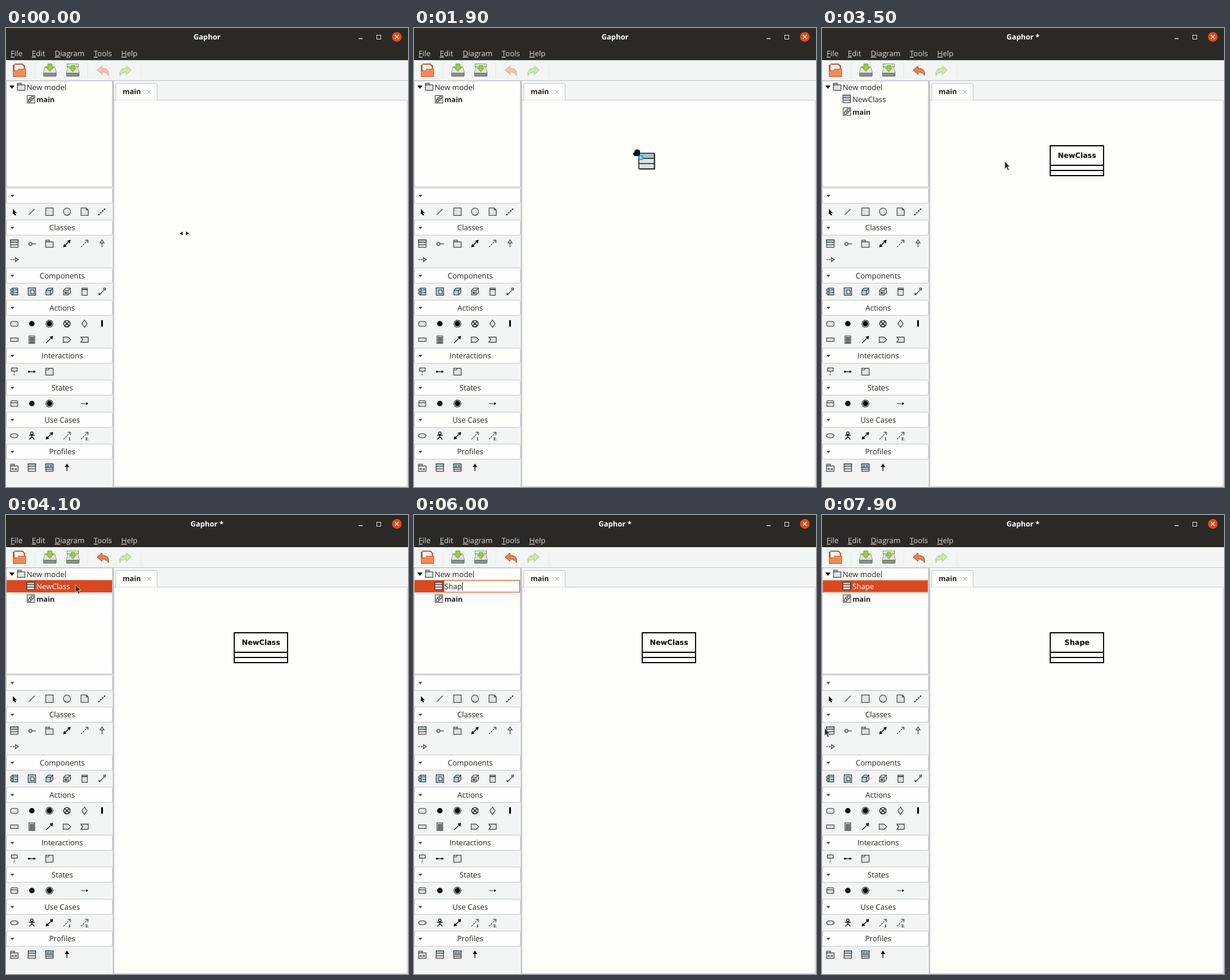
These frames come from a looping animation (701 px wide and 799 px high, 8 s). An HTML page:

```html
<!DOCTYPE html>
<html lang="en">
<head>
<meta charset="utf-8">
<title>Model editor</title>
<style>
  html, body { margin: 0; width: 100%; height: 100%; overflow: hidden; background: #f2f5f4; }
  svg { display: block; width: 701px; height: 799px; }
  text { font: 500 13.1px "Open Sans", "Noto Sans", sans-serif; fill: #242423; text-rendering: geometricPrecision; white-space: pre; }
  .bold { font-weight: 700; font-size: 12.4px; fill: #1e1e1d; }
  .title { font-weight: 700; font-size: 12.8px; fill: #fff; text-anchor: middle; }
  .menu { fill: #dad8d0; }
  .menu tspan { text-decoration: underline; }
  .head { text-anchor: middle; }
  .uml { font: bold 12.45px "DejaVu Sans", sans-serif; fill: #000; text-anchor: middle; }
  .icon { fill: none; stroke: #30302f; stroke-width: 1.1; }
  .icon .b { fill: #b3ccd7; }
  .icon .g { fill: #e1e4e3; }
  .icon .k { fill: #000; stroke: none; }
  .icon .w { stroke-width: 1.4; stroke: #111; }
  .icon .d { stroke-dasharray: 3 1.5; }
  .icon text { font: bold 8px "Liberation Serif", serif; fill: #222; stroke: none; }
  .icon .q { font: bold 8px "DejaVu Sans", sans-serif; text-anchor: middle; }
</style>
</head>
<body>
<svg id="stage" viewBox="0 0 701 799" xmlns="http://www.w3.org/2000/svg"></svg>
<script>
const LOOP = 8000;
const WHITE = '#fefefb', BORDER = '#bfc4c7', ORANGE = '#d9481f', INK = '#242423';

// Markup helpers
const path = (d, cls = '', more = '') => `<path d="${d}" class="${cls}" ${more}/>`;
const rect = (x, y, w, h, cls = '', more = '') =>
  `<rect x="${x}" y="${y}" width="${w}" height="${h}" class="${cls}" ${more}/>`;
const circle = (r, cls = '', x = 0, y = 0) => `<circle cx="${x}" cy="${y}" r="${r}" class="${cls}"/>`;
const text = (x, y, s, cls = '', more = '') => `<text x="${x}" y="${y}" class="${cls}" ${more}>${s}</text>`;
const group = (id, body, more = '') => `<g id="${id}" ${more}>${body}</g>`;
const paint = (fill, stroke = 'none') => `fill="${fill}" stroke="${stroke}"`;

const HEAD_NE = 'M.5 -5L6.5 -6.5L5 -.5Z', HEAD_SW = 'M-.5 5L-6.5 6.5L-5 .5Z';
const stripes = rect(-6.5, -6.5, 13, 13, 'g') + rect(-6.5, -6.5, 13, 4.3, 'b') + path('M-6.5 2H6.5');
const dashedArrow = path('M-6 6L5 -5', 'd') + path('M1 -6H6V-1');
const bothWays = path('M-5 5L5 -5', 'w') + path(HEAD_NE + HEAD_SW, 'k');
const folder = path('M-6.5 -3V-6H0V-3', 'b') + rect(-6.5, -3, 13, 9.5, 'g');
const cube = cls => path('M-6 -2L-2 -6H6V2L2 6H-6Z', cls) + path('M-6 -2H2V6M2 -2L6 -6');

// Icons are drawn around their own centre
const icons = {
  pointer: path('M-2.5 -4.5V5L-.5 3.2L1.2 6.8L3 6L1.4 2.5H4.5Z', 'k'),
  line: path('M-5 5L5 -5'),
  box: rect(-6.5, -6.5, 13, 13, 'g'),
  ellipse: circle(6.3, 'g'),
  note: path('M-6 -6.5H3L6.5 -3V6.5H-6Z', 'g') + path('M3 -6.5V-3H6.5'),
  dashes: path('M-6.5 6L6.5 -6.5', 'd', 'stroke-width="2"'),
  cls: stripes,
  iface: circle(2.8, 'g', -2.5, .5) + path('M.5 .5H7'),
  pkg: folder,
  assoc: bothWays,
  depend: dashedArrow,
  general: path('M0 6V-1') + path('M-3.5 -1L0 -6.5L3.5 -1Z', 'g'),
  realize: path('M-7 0H2', 'd') + path('M2 -3.5L7 0L2 3.5Z', 'g'),
  component: rect(-4, -6, 10, 12, 'b') + rect(-6.5, -4, 5, 3, 'g') + rect(-6.5, 1, 5, 3, 'g') + path('M1 -3H6M1 2H6'),
  artifact: rect(-6.5, -6.5, 13, 13, 'b') + path('M-2 -3H2L4 -1V4H-2Z', 'g'),
  node: cube('b'),
  device: cube('g') + path('M-4 1H0M-4 3.5H0', 'w'),
  subsystem: rect(-4.5, -6, 9.5, 12.5, 'g') + path('M-4.5 -3.5H5', 'w'),
  connector: path('M-3 4L4 -3') + rect(-6, 3, 3, 3, 'k') + rect(3, -6, 3, 3, 'g'),
  action: rect(-6.5, -4, 13, 8.5, 'g', 'rx="3.5"'),
  dot: circle(4.7, 'k'),
  ring: circle(6.2, 'g') + circle(4.7, 'k'),
  flowEnd: circle(5.7, 'g w') + path('M-4 -4L4 4M-4 4L4 -4', 'w'),
  diamond: path('M0 -6.5L4.5 0L0 6.5L-4.5 0Z', 'g'),
  bar: rect(-1.5, -6, 3, 11, 'k'),
  object: rect(-6.5, -3, 13, 6, 'g'),
  partition: rect(-5, -6.5, 10, 13, 'g') + rect(-2.8, -4, 2, 9, 'b') + rect(1, -4, 2, 9, 'b'),
  flow: path('M-6 6L4 -4', 'w') + path(HEAD_NE, 'k'),
  send: path('M-6.5 -4.5H2L6.5 0L2 4.5H-6.5Z', 'g'),
  accept: path('M-6.5 -4.5H6.5V4.5H-6.5L-3 0Z', 'g'),
  lifeline: rect(-5, -6.5, 10, 5.5, 'g') + path('M0 -1V7', 'd'),
  message: path('M-5 0H5', 'w') + path('M3 -2.5L7 0L3 2.5Z', 'k') + circle(1.8, 'k', -5),
  frame: rect(-6.5, -6, 13, 12, 'g') + path('M-6.5 -3H-2L0 -6'),
  state: rect(-6, -5, 12, 10, 'g', 'rx="2"') + path('M-6 -1.5H6'),
  arrow: path('M-6 0H5') + path('M3 -2.5L6.5 0L3 2.5Z', 'k'),
  useCase: `<ellipse rx="6.7" ry="3.5" class="g"/>`,
  actor: circle(2.2, 'w', 0, -4.5) + path('M0 -2V2M-5 -1H5M-4.5 6.5L0 2L4.5 6.5', 'w'),
  include: dashedArrow + text(3, 8, 'I'),
  extend: dashedArrow + text(1.5, 8, 'E'),
  profile: folder + text(0, 5, '«»', 'q'),
  stereotype: rect(-6.5, -6.5, 13, 13, 'g') + rect(-6.5, -6.5, 13, 7, 'b') + path('M-6.5 3.5H6.5') + text(0, 0, '«»', 'q'),
  extension: path('M0 6V-2', 'w') + path('M-4 -1L0 -7L4 -1Z', 'k'),
  diagram: rect(-6.5, -6.5, 13, 13, '', 'fill="#fff"') + rect(.5, -4.5, 4, 4) + rect(-4.5, .5, 4, 4) +
    path('M-2.5 .5V-2.5H.5M-.5 2.5H2.5V-.5')
};
const icon = (name, x, y) => `<g class="icon" transform="translate(${x} ${y})">${icons[name] || ''}</g>`;

// Header label, header centre, then one row of icons per string
const palette = [
  ['', 292, 'pointer line box ellipse note dashes'],
  ['Classes', 347.5, 'cls iface pkg assoc depend general', 'realize'],
  ['Components', 431, 'component artifact node device subsystem connector'],
  ['Actions', 487, 'action dot ring flowEnd diamond bar', 'object partition flow send accept'],
  ['Interactions', 570.5, 'lifeline message frame'],
  ['States', 626, 'state dot ring - arrow'],
  ['Use Cases', 682, 'useCase actor assoc include extend'],
  ['Profiles', 737.5, 'profile cls stereotype extension']
];
const section = ([label, y, ...rows]) =>
  rect(.5, y - 13.3, 185, 26.6, '', `rx="3" ${paint(WHITE, BORDER)}`) +
  path(`M7.5 ${y - 1.5}h7l-3.5 4z`, '', `fill="#444" id="fold${label.replace(' ', '')}"`) +
  text(98, y + 4.7, label, 'head') +
  rows.map((row, r) => row.split(' ').map((name, c) =>
    icon(name, 14.5 + c * 30.6, y + 27.8 + r * 27.8)).join('')).join('');

const titleBar = rect(0, 0, 701, 56, '', paint('#2a2925')) +
  text(350.5, 20, 'Gaphor', 'title', 'id="title"') +
  path('M615 18.5H622', '', 'stroke="#ddd" stroke-width="1.6"') +
  rect(646.5, 12.5, 7, 7, '', paint('none', '#e8e8e4')) +
  `<circle cx="681.5" cy="15.5" r="8.5" fill="#e2491f"/>` +
  path('M678 12L685 19M678 19L685 12', '', 'stroke="#fff" stroke-width="1.3"') +
  [['File', 8], ['Edit', 45], ['Diagram', 85], ['Tools', 153], ['Help', 201]].map(([s, x]) =>
    text(x, 49, `<tspan>${s[0]}</tspan>${s.slice(1)}`, 'menu')).join('');

const drive = path('M65 79L68 67.5H85L88 79Z', '', paint('#e4e6e2', '#8d918b')) +
  rect(65.5, 78.5, 22, 5.5, '', `rx="1" ${paint('#8b8f88', '#646862')}`);
const downArrow = path('M73 62.5H80V68H83.5L76.5 75.5L69.5 68H73Z', '', paint('#9ccc4a', '#5d9a22'));
const curl = 'M159 73L167.5 66V70C176 70 181 75 178.5 83C176.5 78.5 173 77 167.5 77V81Z';
const toolbar = rect(0, 56, 701, 36, '', paint('#f2f5f3')) +
  [50.5, 142.5, 235.5].map(x => path(`M${x} 61V87`, '', 'stroke="#e6e9e7"')).join('') +
  path('M12.5 64.5H15V62.5H29L32.5 66V84H12.5Z', '', paint('#c9502a', '#a83c1a')) +
  path('M15 64H28L31 67V76H15Z', '', paint('#f4f3ef', '#c9c4bf')) +
  path('M12.5 74.5H20L22 71.5H34.5V84.5H12.5Z', '', paint('#f08a58', '#cf5426')) +
  drive + downArrow +
  `<g transform="translate(40 0)">${drive}${rect(66.5, 62.5, 20, 5, '', paint('#eef5e2', '#6f9a45'))}` +
  `<g transform="translate(11.5 12) scale(.85)">${downArrow}</g></g>` +
  path(curl, '', `id="undo" stroke-linejoin="round"`) +
  path(curl, '', `transform="translate(377.5 0) scale(-1 1)" ${paint('#cfe6b0', '#a9c592')}`) +
  path('M0 91.5H701', '', `stroke="${BORDER}"`);

const canvasPane = rect(186, 92, 515, 33, '', paint('#f4f6f6')) +
  rect(188, 125.5, 511.5, 673, '', paint(WHITE, BORDER)) +
  path('M187.3 92V799', '', 'stroke="#bcc1c5" stroke-width="2"') +
  path('M191.5 125.5V99.5Q191.5 96.5 194.5 96.5H260.5Q263.5 96.5 263.5 99.5V125.5', '', paint(WHITE, BORDER)) +
  text(203.5, 115, 'main', 'bold') +
  path('M246 108L252 114M246 114L252 108', '', 'stroke="#b8babb" stroke-width="1.2"');

const corner = (x, y) => `<g transform="translate(${x} ${y})">` +
  rect(-4, -4, 8, 8, '', `${paint('#00ff00', '#007a00')} fill-opacity=".45"`) +
  path('M-2 -2L2 2M-2 2L2 -2', '', 'stroke="#075a07"') + '</g>';
const classItem = group('item',
  path('M398 205H491V257H398ZM398 239H491M398 248H491', '', `${paint('none', '#000')} stroke-width="1.9"`) +
  text(444.7, 225.5, '', 'uml', 'id="itemName"') +
  group('handles', corner(397.5, 204.5) + corner(491.5, 204.5) + corner(397.5, 257.5) + corner(491.5, 257.5)));

const tree = rect(.5, 92, 185, 184.7, '', `${paint(WHITE, BORDER)} stroke-width="1.2"`) +
  path('M5.5 100H15L10.2 106Z', '', 'fill="#222"') + icon('pkg', 26.5, 102) + text(36, 107.5, 'New model') +
  group('selection', rect(1, 113.3, 184, 21.5, '', paint(ORANGE))) +
  rect(1.5, 114, 183, 20, '', `id="focus" ${paint('none', '#f7cdbf')} stroke-dasharray="1 1"`) +
  rect(52.5, 113.8, 131.8, 20.5, '', `id="entry" ${paint(WHITE, ORANGE)}`) +
  rect(53, 116, 61, 16, '', `id="marked" ${paint(ORANGE)}`) +
  group('classRow', icon('cls', 43, 123.5) + text(53, 129, '', '', 'id="rowName"')) +
  path('M0 117V132', '', 'id="caret" stroke="#222"') +
  group('mainRow', icon('diagram', 43.5, 124) + text(53, 129, 'main', 'bold'));

const dragged = group('dragged',
  rect(2, 2, 28, 28, '', paint('#555') + ' opacity=".6"') +
  rect(1, 1, 27, 27, '', paint('#dfe2e2')) + rect(1, 1, 27, 9, '', paint('#a2c2d1')) +
  path('M1 1H28V28H1ZM1 10H28M1 19H28', '', `${paint('none', '#1c1c1c')} stroke-width="1.6"`));

const cursors = group('resize', path('M-8 0L-3 -3.2V3.2ZM8 0L3 -3.2V3.2Z', '', 'fill="#000"')) +
  group('arrow', path('M.5 0V13.5L3.6 10.5L6 16L8.3 15L6 9.6H10Z', '', paint('#2d2d2d', '#fff') + ' stroke-width=".7"')) +
  group('ibeam', path('M-3 -7.5H-1L0 -6.5L1 -7.5H3M0 -6.5V6.5M-3 7.5H-1L0 6.5L1 7.5H3', '', paint('none', '#222'))) +
  group('hand', path('M-4 -3L-2 -4L0 -5L3 -4L5 -3V4L4 7H-4L-7 4V1H-5Z', '', paint('#111')) +
    `<circle cx="6.5" cy="9.5" r="4.6" fill="#29a3dc"/>` +
    path('M4 9.5H9M6.5 7V12', '', 'stroke="#fff" stroke-width="1.2"'));

const stage = document.getElementById('stage');
stage.innerHTML = rect(0, 0, 701, 799, '', paint('#f2f5f4')) + titleBar + toolbar + canvasPane + tree +
  palette.map(section).join('') + classItem + dragged + cursors;

// Steps: time, then the values that hold from there on
const pointerSteps = [
  [0, 'resize', 311, 357.5], [300, 'arrow', 310, 356],
  [500, 'arrow', 280, 358], [600, 'arrow', 180, 363], [700, 'arrow', 70, 371], [800, 'arrow', 9, 375],
  [1300, 'hand', 83, 346], [1400, 'hand', 238, 300], [1500, 'hand', 365, 240],
  [1800, 'hand', 383, 224], [1900, 'hand', 389, 216], [2000, 'hand', 393, 210], [2100, 'hand', 396, 206], [2200, 'hand', 397, 204],
  [2400, 'arrow', 397, 203], [2700, 'arrow', 395, 207], [2900, 'arrow', 394, 209], [3100, 'arrow', 394, 210],
  [3300, 'arrow', 382, 222], [3400, 'arrow', 354, 232], [3500, 'arrow', 318, 232],
  [3600, 'arrow', 260, 209], [3700, 'arrow', 205, 172], [3800, 'arrow', 164, 148],
  [4000, 'arrow', 133, 127], [4100, 'arrow', 120.5, 121.5], [5000, 'ibeam', 121, 124], [5500, ''],
  [7200, 'arrow', 121, 122], [7300, 'arrow', 120, 210], [7400, 'arrow', 112, 333],
  [7600, 'arrow', 21, 386], [7900, 'arrow', 4, 371]
];
const dragSteps = [
  [0], [1300, 226, 290], [1400, 326, 254], [1500, 381, 229],
  [1800, 386, 224], [1900, 391, 217], [2000, 395, 211], [2100, 397, 208], [2200, 398, 206], [2400]
];
const nameSteps = [[0, ''], [2400, 'NewClass'], [5500, 'S'], [6000, 'Shap'], [6300, 'Shape']];

const el = Object.fromEntries([...stage.querySelectorAll('[id]')].map(node => [node.id, node]));
const at = (steps, t) => steps.findLast(step => step[0] <= t).slice(1);
const show = (id, on) => el[id].setAttribute('visibility', on ? 'visible' : 'hidden');
const move = (id, x = 0, y = 0) => el[id].setAttribute('transform', `translate(${x} ${y})`);
const say = (id, s) => { if (el[id].textContent !== s) el[id].textContent = s; };

function render(t) {
  const between = (from, to = LOOP) => t >= from && t < to;
  const created = between(2400), editing = between(5000, 6300), picked = between(4100);

  const [kind, x, y] = at(pointerSteps, t);
  for (const id of ['resize', 'arrow', 'ibeam', 'hand']) show(id, id === kind);
  if (kind) move(kind, x, y);

  const [dragX, dragY] = at(dragSteps, t);
  show('dragged', dragX !== undefined);
  move('dragged', dragX, dragY);

  say('title', created ? 'Gaphor *' : 'Gaphor');
  el.undo.setAttribute('fill', created ? '#ed8050' : '#f0c3ac');
  el.undo.setAttribute('stroke', created ? '#a94a20' : '#d6a893');

  show('item', created);
  show('handles', between(2500, 2700));
  say('itemName', between(6300) ? 'Shape' : 'NewClass');

  const [name] = at(nameSteps, t);
  say('rowName', name);
  show('classRow', created);
  move('mainRow', 0, created ? 21.5 : 0);
  show('selection', picked);
  show('focus', between(6300));
  show('entry', editing);
  show('marked', between(5000, 5500));
  el.rowName.style.fill = picked && !between(5500, 6300) ? '#fff' : INK;

  show('caret', between(5500, 6300));
  move('caret', Math.round(53 + el.rowName.getComputedTextLength()) + .5);
  el.foldClasses.setAttribute('fill', between(7400, 7600) ? '#111' : '#444');
}

function tick(now) {
  render(now % LOOP);
  requestAnimationFrame(tick);
}
render(0);
requestAnimationFrame(tick);
</script>
</body>
</html>
```
